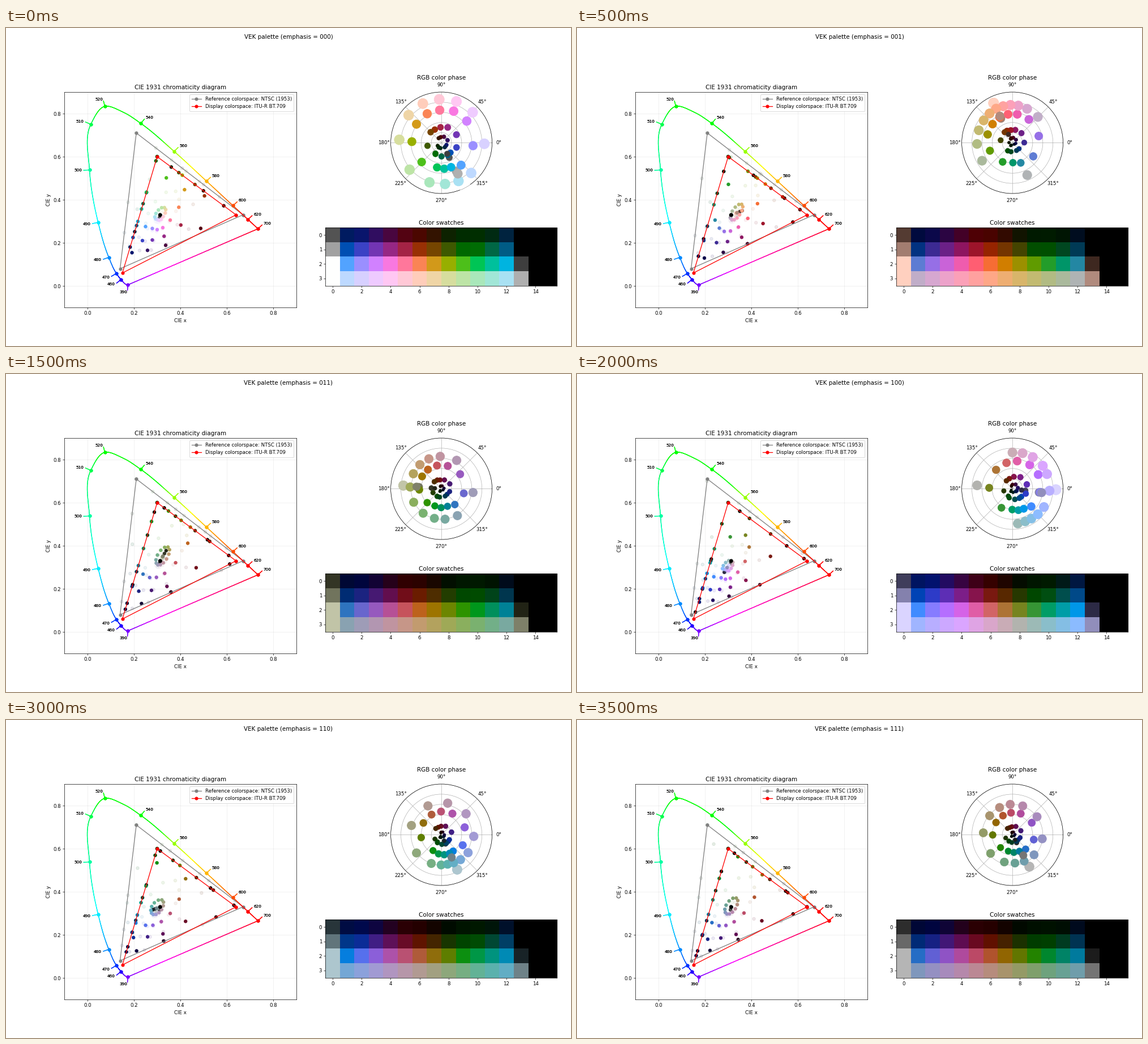
Recreate the animation shown at these times as a matplotlib script. Size 998 by 561 pixels, loop 4 s.

```python
import numpy as np
import matplotlib.pyplot as plt
from matplotlib.animation import FuncAnimation
from matplotlib.collections import LineCollection

W, H, DPI = 998, 561, 62.375
plt.rcParams["font.family"] = "DejaVu Sans"

# Composite signal levels per row: normal, then attenuated
HIGH = np.array([[0.616, 0.840, 1.100, 1.100], [0.500, 0.676, 0.896, 0.896]])
LOW = np.array([[0.228, 0.312, 0.552, 0.880], [0.192, 0.256, 0.448, 0.712]])
BLACK, WHITE = 0.312, 1.100
PHASE = np.arange(12)
CARRIER = np.radians(15 - 30 * PHASE)
LUMA = np.array([0.299, 0.587, 0.114])
GREY_ANGLE = np.radians(-62)  # where colours without chroma are put

NTSC = np.array([[0.67, 0.33], [0.21, 0.71], [0.14, 0.08]])
BT709 = np.array([[0.64, 0.33], [0.30, 0.60], [0.15, 0.06]])
WHITE_C = (0.31006, 0.31616)
WHITE_D65 = (0.3127, 0.3290)
CAT02 = np.array([[0.7328, 0.4296, -0.1624],
                  [-0.7036, 1.6975, 0.0061],
                  [0.0030, 0.0136, 0.9834]])

# Key points of the spectral locus: wavelength -> x, y
LOCUS = {390: (.1738, .0049), 420: (.1714, .0051), 460: (.1440, .0297),
         470: (.1241, .0578), 480: (.0913, .1327), 490: (.0454, .2950),
         500: (.0082, .5384), 510: (.0139, .7502), 520: (.0743, .8338),
         530: (.1547, .8059), 540: (.2296, .7543), 560: (.3731, .6245),
         580: (.5125, .4866), 600: (.6270, .3725), 620: (.6915, .3083),
         700: (.7347, .2653)}
UNLABELLED = (420, 530)


def xy_to_xyz(xy):
    x, y = np.asarray(xy, float).T
    return np.stack([x / y, np.ones_like(y), (1 - x - y) / y], axis=-1)


def rgb_to_xyz_matrix(primaries, white):
    m = xy_to_xyz(primaries).T
    return m * np.linalg.solve(m, xy_to_xyz(white))


M_NTSC = rgb_to_xyz_matrix(NTSC, WHITE_C)
M_709 = rgb_to_xyz_matrix(BT709, WHITE_D65)
GAIN = (CAT02 @ xy_to_xyz(WHITE_D65)) / (CAT02 @ xy_to_xyz(WHITE_C))
ADAPT = np.linalg.inv(CAT02) @ np.diag(GAIN) @ CAT02
NTSC_TO_709 = np.linalg.inv(M_709) @ ADAPT @ M_NTSC


def srgb_decode(v):
    return np.where(v <= 0.04045, v / 12.92, ((v + 0.055) / 1.055) ** 2.4)


def srgb_encode(lin):
    return np.where(lin <= 0.0031308, 12.92 * lin,
                    1.055 * lin ** (1 / 2.4) - 0.055)


def bt709_encode(lin):
    return np.where(lin < 0.018, 4.5 * lin, 1.099 * lin ** 0.45 - 0.099)


def in_phase(hue):
    return (hue + PHASE) % 12 < 6


def signal(row, col, dim):
    if col > 13:
        return np.full(12, BLACK)
    if col in (0, 13):
        high = np.full(12, col == 0)
    else:
        high = in_phase(col)
    level = dim.astype(int)
    return np.where(high, HIGH[level, row], LOW[level, row])


def palette(emphasis):
    """Decoded colours before and after the change of colour space."""
    dim = np.zeros(12, bool)
    for bit, hue in enumerate((0, 4, 8)):
        if emphasis >> bit & 1:
            dim |= in_phase(hue)
    volts = np.array([signal(r, c, dim) for r in range(4) for c in range(16)])
    volts = (volts - BLACK) / (WHITE - BLACK)
    y = volts.mean(axis=1)
    u = (volts * np.cos(CARRIER)).mean(axis=1)
    v = (volts * np.sin(CARRIER)).mean(axis=1)
    red, blue = y + v / 0.877, y + u / 0.492
    green = (y - LUMA[0] * red - LUMA[2] * blue) / LUMA[1]
    raw = np.clip(np.stack([red, green, blue], axis=1), 0, 1)
    raw[raw < 1e-9] = 0
    lin = np.clip(srgb_decode(raw) @ NTSC_TO_709.T, 0, 1)
    return raw, np.clip(bt709_encode(lin), 0, 1)


def chromaticity(rgb, matrix, white):
    xyz = rgb @ matrix.T
    total = xyz.sum(axis=1, keepdims=True)
    dark = total < 1e-9
    return np.where(dark, white, xyz[:, :2] / np.where(dark, 1, total))


def polar_points(rgb):
    luma = rgb @ LUMA
    u, v = 0.492 * (rgb[:, 2] - luma), 0.877 * (rgb[:, 0] - luma)
    theta = np.where(np.hypot(u, v) < 1e-3, GREY_ANGLE, np.arctan2(v, u))
    return theta, luma


def locus_color(xy):
    lin = np.clip(xy_to_xyz(xy) @ np.linalg.inv(M_709).T, 0, None)
    rgb = srgb_encode(lin)
    return rgb / rgb.max(axis=-1, keepdims=True)


def smooth(s, pts, slope, n=16):
    """Cubic Hermite curve through the points."""
    t = np.linspace(0, 1, n, endpoint=False)[:, None]
    parts = []
    for i, step in enumerate(np.diff(s)):
        parts.append((2 * t**3 - 3 * t**2 + 1) * pts[i]
                     + (t**3 - 2 * t**2 + t) * step * slope[i]
                     + (3 * t**2 - 2 * t**3) * pts[i + 1]
                     + (t**3 - t**2) * step * slope[i + 1])
    return np.vstack(parts)


def draw_locus(ax):
    pts = np.array(list(LOCUS.values()))
    chords = np.hypot(*np.diff(pts, axis=0).T)
    s = np.concatenate([[0], np.cumsum(chords)])
    slope = np.gradient(pts, s, axis=0)
    purple = np.linspace(pts[-1], pts[0], 80)
    path = np.vstack([smooth(s, pts, slope), purple])
    mid = (path[:-1] + path[1:]) / 2
    ax.add_collection(LineCollection(
        np.stack([path[:-1], path[1:]], axis=1), colors=locus_color(mid),
        linewidths=1.5, capstyle="round", zorder=2))

    for wl, p, (dx, dy) in zip(LOCUS, pts, slope):
        if wl in UNLABELLED:
            continue
        normal = np.array([-dy, dx]) / np.hypot(dx, dy) / 30
        if normal @ (p - 1 / 3) < 0:
            normal = -normal
        color = locus_color(p)
        tip, spot = p + 0.75 * normal, p + normal
        ax.plot([p[0], tip[0]], [p[1], tip[1]], color=color)
        ax.plot(*p, "o", color=color)
        ax.text(*spot, wl, size="small", va="center",
                ha="left" if normal[0] >= 0 else "right")


def draw_gamut(ax, primaries, color, label):
    draw_locus(ax)
    x, y = np.vstack([primaries, primaries[:1]]).T
    ax.plot(x, y, "o-", color=color, label=label)


def place(left, top, right, bottom, **kw):
    return fig.add_axes([left / W, 1 - bottom / H,
                         (right - left) / W, (bottom - top) / H], **kw)


def recolor(dots, xy, rgb):
    dots.set_offsets(xy)
    dots.set_facecolor(rgb)
    dots.set_edgecolor(rgb)


fig = plt.figure(figsize=(W / DPI, (H + 1e-6) / DPI), dpi=DPI)
title = fig.suptitle("")

diagram = place(103.2, 113, 512.8, 493)
diagram.set(title="CIE 1931 chromaticity diagram", xlabel="CIE x",
            ylabel="CIE y", xlim=(-0.1, 0.9), ylim=(-0.1, 0.9),
            xticks=np.arange(5) / 5, yticks=np.arange(5) / 5)
diagram.grid(alpha=0.25)
origin = np.zeros(64)
faint = diagram.scatter(origin, origin, s=40, alpha=0.1, zorder=1.6)
solid = diagram.scatter(origin, origin, s=40, zorder=1.7)
draw_gamut(diagram, NTSC, "grey", "Reference colorspace: NTSC (1953)")
draw_gamut(diagram, BT709, "red", "Display colorspace: ITU-R BT.709")
diagram.legend(loc="upper right")

wheel = place(679.6, 113, 858.6, 292, projection="polar")
wheel.set_title("RGB color phase")
wheel.set_ylim(0, 1)
wheel.set_yticks(np.arange(1, 6) / 5)
wheel.set_yticklabels([])
hues = wheel.scatter(origin, origin, s=40, zorder=3)

swatches = place(564.4, 352.3, 973.4, 454.8)
image = swatches.imshow(np.zeros((4, 16, 3)), aspect="auto",
                        interpolation="nearest")
swatches.set(title="Color swatches", xticks=range(0, 16, 2), yticks=range(4))


def update(emphasis):
    raw, rgb = palette(emphasis)
    title.set_text(f"VEK palette (emphasis = {emphasis:03b})")
    recolor(faint, chromaticity(raw, M_NTSC, WHITE_C), raw)
    recolor(solid, chromaticity(rgb, M_709, WHITE_D65), rgb)
    theta, luma = polar_points(rgb)
    recolor(hues, np.column_stack([theta, luma]), rgb)
    hues.set_sizes(500 * luma)
    image.set_data(rgb.reshape(4, 16, 3))
    return title, faint, solid, hues, image


anim = FuncAnimation(fig, update, frames=8, interval=500, repeat=True,
                     repeat_delay=0, blit=False)
plt.show()
```
